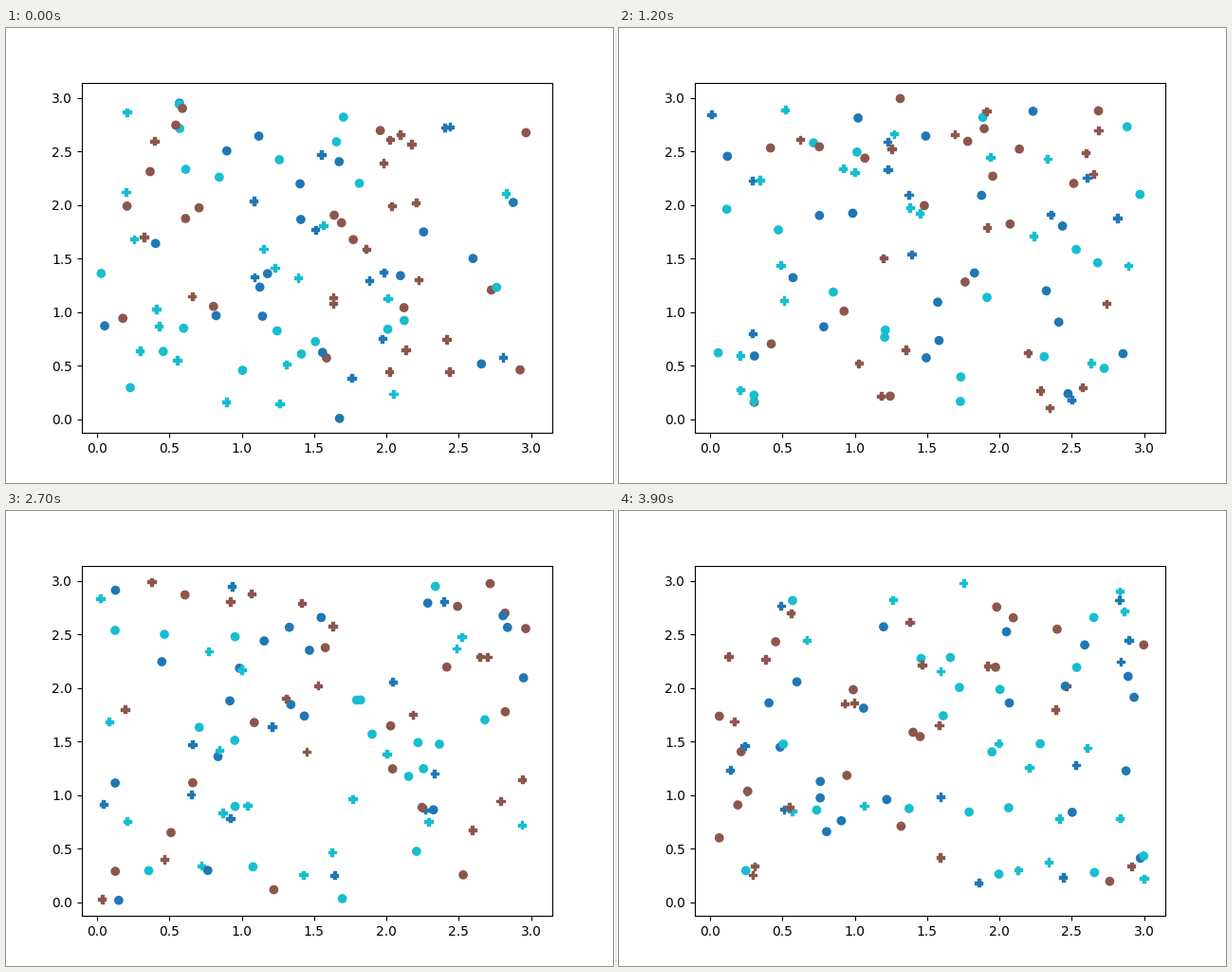
A matplotlib script for the animation above (4 s loop, 640x480 px).

```python
import numpy as np
import matplotlib.pyplot as plt
from matplotlib.animation import FuncAnimation
from matplotlib.markers import MarkerStyle

FRAMES, INTERVAL = 40, 100
SIDE = 3.0

# (marker, colour, how many)
GROUPS = [
    ("o", "tab:blue", 19), ("o", "tab:brown", 17), ("o", "tab:cyan", 19),
    ("P", "tab:blue", 11), ("P", "tab:brown", 17), ("P", "tab:cyan", 17),
]


def marker_path(name):
    style = MarkerStyle(name)
    return style.get_path().transformed(style.get_transform())


def positions(frame):
    """Every frame throws all points anew over the square."""
    rng = np.random.default_rng(1000 + frame)
    return rng.uniform(0, SIDE, (len(points), 2))


# One shared, shuffled drawing order for both marker shapes.
points = [(m, c) for m, c, count in GROUPS for _ in range(count)]
order = np.random.default_rng(7).permutation(len(points))
points = [points[i] for i in order]

fig, ax = plt.subplots(figsize=(6.4, 4.8), dpi=100)
ax.set_xlim(-0.105, 3.147)
ax.set_ylim(-0.127, 3.144)

scatter = ax.scatter(*positions(0).T, c=[c for _, c in points])
paths = {name: marker_path(name) for name in "oP"}
scatter.set_paths([paths[m] for m, _ in points])


def update(frame):
    scatter.set_offsets(positions(frame))
    return (scatter,)


anim = FuncAnimation(fig, update, frames=FRAMES, interval=INTERVAL,
                     repeat=True, repeat_delay=0)
plt.show()
```
